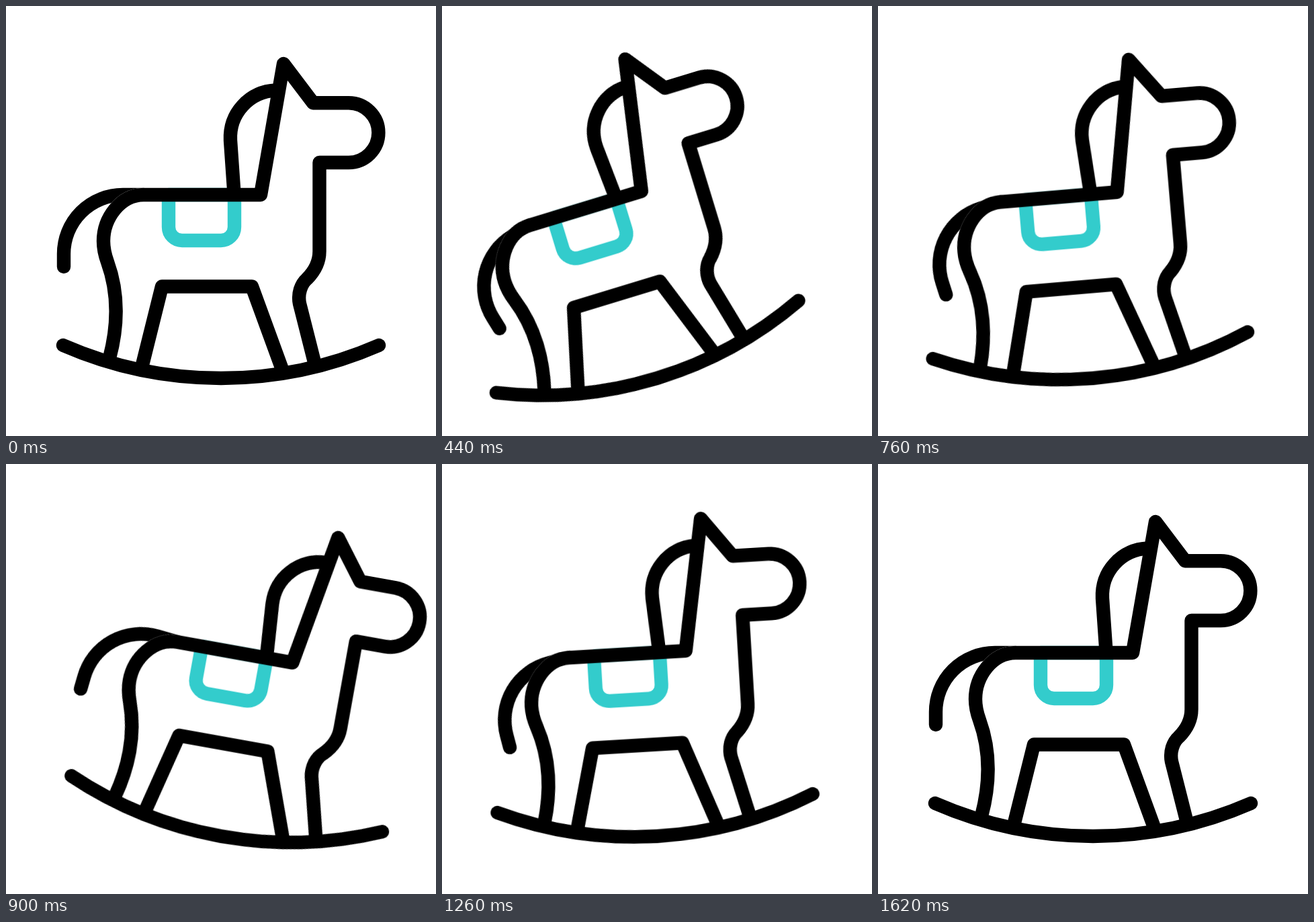
Write an HTML page that moves like this. It is 640x640 px and loops after 1860 ms.

```html
<!DOCTYPE html>
<html lang="en">
<head>
<meta charset="utf-8">
<title>Rocking horse</title>
<style>
  html, body { margin: 0; width: 100%; height: 100%; overflow: hidden; background: #fff; }
  svg { display: block; width: 100vw; height: 100vh; }

  .line { fill: none; stroke: #000; stroke-width: 20.4; stroke-linecap: round; stroke-linejoin: round; }
  .cover { fill: #fff; stroke: #fff; }
  .saddle { stroke: #3cc; }

  .horse, .tail { animation: 1860ms cubic-bezier(.333, 0, .667, 1) infinite; }
  .horse { transform-origin: 320px 554px; animation-name: rock; }
  .tail { transform-origin: 205px 281px; animation-name: swish; }

  /* Damped swings, then a short rest */
  @keyframes rock {
    0% { transform: rotate(0deg); }
    32.258% { transform: rotate(-20.5deg); }
    49.462% { transform: rotate(10.5deg); }
    64.516% { transform: rotate(-5deg); }
    75.269% { transform: rotate(2.2deg); }
    87.097%, 100% { transform: rotate(0deg); }
  }

  /* The tail trails the body by 60 ms */
  @keyframes swish {
    0% { transform: rotate(0deg); }
    35.484% { transform: rotate(-20deg); }
    52.688% { transform: rotate(10.6deg); }
    67.742% { transform: rotate(-11.3deg); }
    78.495% { transform: rotate(4deg); }
    87.097%, 100% { transform: rotate(0deg); }
  }
</style>
</head>
<body>
<svg viewBox="0 0 640 640">
  <defs>
    <path id="body" d="M154 524C167 475 167 425 151 381C147 370 145 360 145 350C145 316 170 281 205 281H379L413 86L457 144.200H510A44.400 44.400 0 0 1 510 233H466.500V365C466.500 381 460 394 448 406C439 414 434 428 437 443L458.500 528"/>
  </defs>
  <g class="horse line">
    <path class="tail" d="M205 281H174A88 88 0 0 0 86 369V388"/>
    <use href="#body" class="cover"/>
    <path class="saddle" d="M242 281H340V329A20 20 0 0 1 320 349H262A20 20 0 0 1 242 329Z"/>
    <path d="M339.500 279L334 200C332 160 362 127 402 125.500"/>
    <use href="#body"/>
    <path d="M203 534L232 417.500H366L410 538"/>
    <path d="M85 505A588 588 0 0 0 555 505"/>
  </g>
</svg>
</body>
</html>
```
